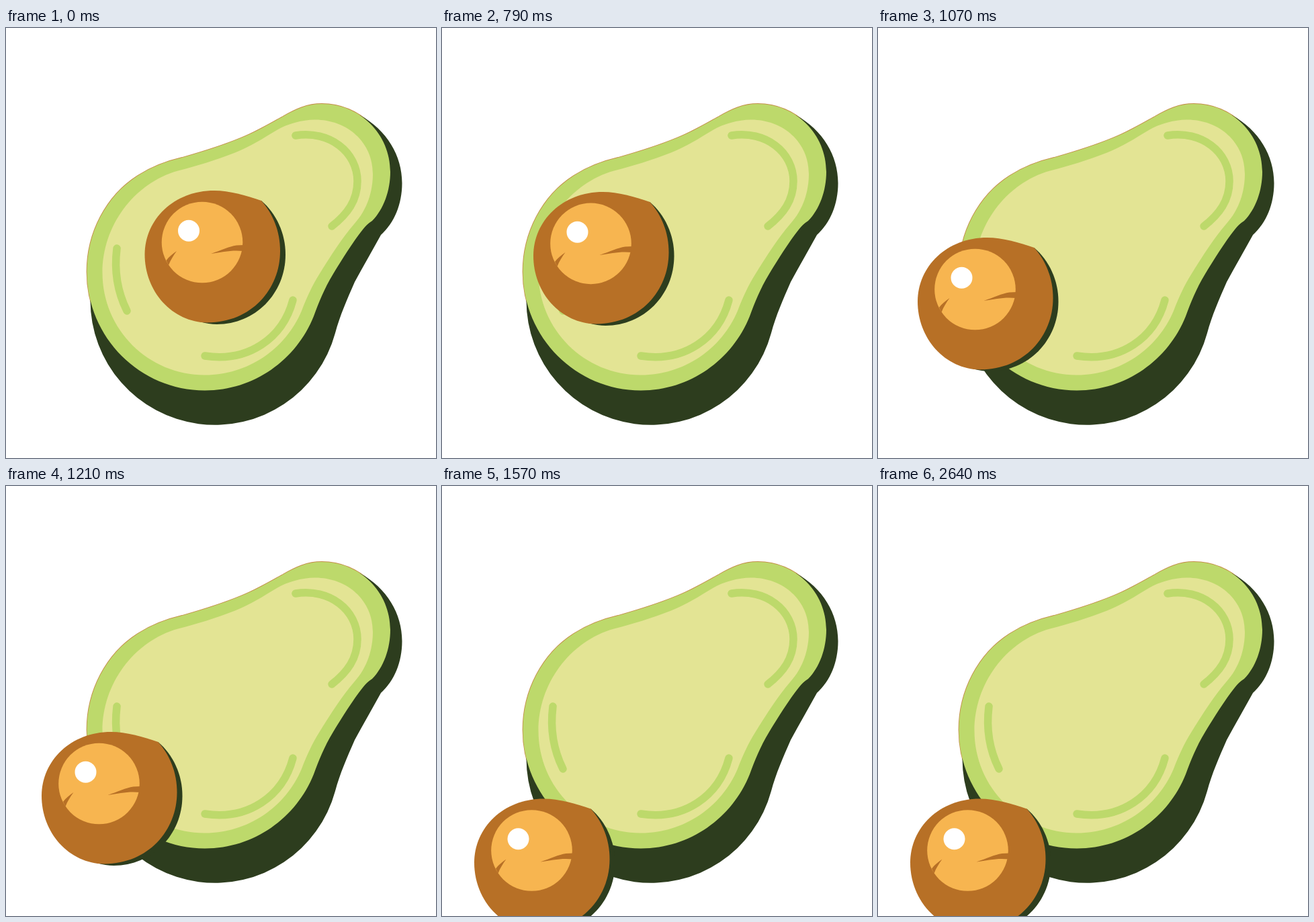
Animation of 640x640 px, one loop 2.67 s. Source, as an HTML page with a canvas:

```html
<!DOCTYPE html>
<html>
<head>
<meta charset="utf-8">
<style>
html, body { margin: 0; width: 100%; height: 100%; overflow: hidden; background: #fff; }
canvas { display: block; width: 100vmin; height: 100vmin; }
</style>
</head>
<body>
<canvas id="stage" width="640" height="640"></canvas>
<script>
const ctx = document.getElementById('stage').getContext('2d');
const LOOP = 2670;
const STEP = LOOP / 75;

const DARK = '#2d3d1e', RIM = '#bdd96b', FLESH = '#e3e494';
const BROWN = '#b77026', AMBER = '#f7b550', FRINGE = '#c48e4a';

const skin = new Path2D(`M527 130 C567 152 589.5 190 589.5 231 C589.5 262 578 290 558 308
  C546 330 532 354 519 378 C508 403 497 428 490 454
  A185.5 185.5 0 0 1 125.5 405.5 L300 300 Z`);
const rim = new Path2D(`M470 113 C448 113 431 121 412 132 C390 144 370 156 349 164
  C320 176 290 185 262 193 C236 199 215 208 196 220 C149 250 120.5 305 120.5 363
  C120.5 461 200 539.5 296 539.5 C369 539.5 432 494 458 429 C465 410 474 387 487 366
  C501 343 516 319 531 300 Q537 292 545 287 C562 270 572 242 572 214
  C572 158 527 113 470 113 Z`);
const flesh = new Path2D(`M460 136.5 C440 136.5 418 143 403 152 C383 164 363 177 341 185.5
  C310 197.5 285 205 256 212.5 C190 231 143.5 295 143.5 364 C143.5 449 212 516.5 296 516.5
  C360 516.5 416 478 440 421 C448 400 456 383 466 367 C484 338 500 313 518 292
  C538 270 546 243 546 217 C546 170 508 136.5 460 136.5 Z`);
const grooves = new Path2D(`M431 160 C482 152 523 185 523 228 C523 257 508 277 485 295
  M165 328 C161 360 166 393 180 421
  M427 405 C412 462 360 498 296 488`);

const pitShadow = new Path2D(`M380 257 C402 276 416 305 416 337 C416 396 370 441 314 441
  Q302 441 288 437 L310 330 Z`);
const pit = new Path2D(`M310 242 C333 242 356 249 380 257 C397 276 408 302 408 332
  C408 389 365 438 300 438.5 C247 438 206.5 392 206.5 337 C206.5 285 250 242 310 242 Z`);
const cracks = new Path2D(`M305 336 C320 331 332 325 343 323.5 L354 323 V332 L343 331.5
  C330 331.5 319 334 305 336 Z
  M254 332 C248 336 242 341 238.5 346 L242 353 C245 345 249 339 254 332 Z`);

// Pit offsets along its roll: [time, x, y]
const route = [
  [595, 0, 0], [762, -64, 1], [930, -120.5, 17.5],
  [1070, -147.5, 70], [1210, -153.5, 124], [1490, -158.5, 223.5]
];

function slope(i, axis) {
  const a = route[Math.max(i - 1, 0)], b = route[Math.min(i + 1, route.length - 1)];
  return (b[axis] - a[axis]) / (b[0] - a[0]);
}

function pitOffset(t) {
  const last = route.length - 1;
  if (t <= route[0][0]) return [0, 0];
  if (t >= route[last][0]) return route[last].slice(1);
  const i = route.findIndex(p => p[0] > t) - 1;
  const a = route[i], b = route[i + 1], span = b[0] - a[0];
  const u = (t - a[0]) / span, v = 1 - u;
  return [1, 2].map(k =>
    v * v * (1 + 2 * u) * a[k] + u * u * (3 - 2 * u) * b[k] +
    span * u * v * (v * slope(i, k) - u * slope(i + 1, k)));
}

function fill(path, color) {
  ctx.fillStyle = color;
  ctx.fill(path);
}

function stroke(path, color, width) {
  ctx.strokeStyle = color;
  ctx.lineWidth = width;
  ctx.stroke(path);
}

function disc(x, y, r, color) {
  ctx.fillStyle = color;
  ctx.beginPath();
  ctx.arc(x, y, r, 0, Math.PI * 2);
  ctx.fill();
}

function drawAvocado() {
  stroke(rim, FRINGE, 1.8);
  fill(skin, DARK);
  fill(rim, RIM);
  fill(flesh, FLESH);
  stroke(grooves, RIM, 11.5);
}

function drawPit(x, y) {
  ctx.save();
  ctx.translate(x, y);
  fill(pitShadow, DARK);
  fill(pit, BROWN);
  disc(292, 319, 60.3, AMBER);
  fill(cracks, BROWN);
  disc(272, 301.8, 16, '#fff');
  ctx.restore();
}

// Poses change on a 10 ms clock, so step starts are rounded to it.
function poseTime(now) {
  const step = Math.floor((now % LOOP + 5) / STEP) % 75;
  return Math.round(step * STEP / 10) * 10;
}

function draw(now) {
  ctx.fillStyle = '#fff';
  ctx.fillRect(0, 0, 640, 640);
  drawAvocado();
  drawPit(...pitOffset(poseTime(now)));
}

ctx.lineCap = 'round';
let start;
function tick(now) {
  start ??= now;
  draw(Math.max(0, now - start));
  requestAnimationFrame(tick);
}
draw(0);
requestAnimationFrame(tick);
</script>
</body>
</html>
```
